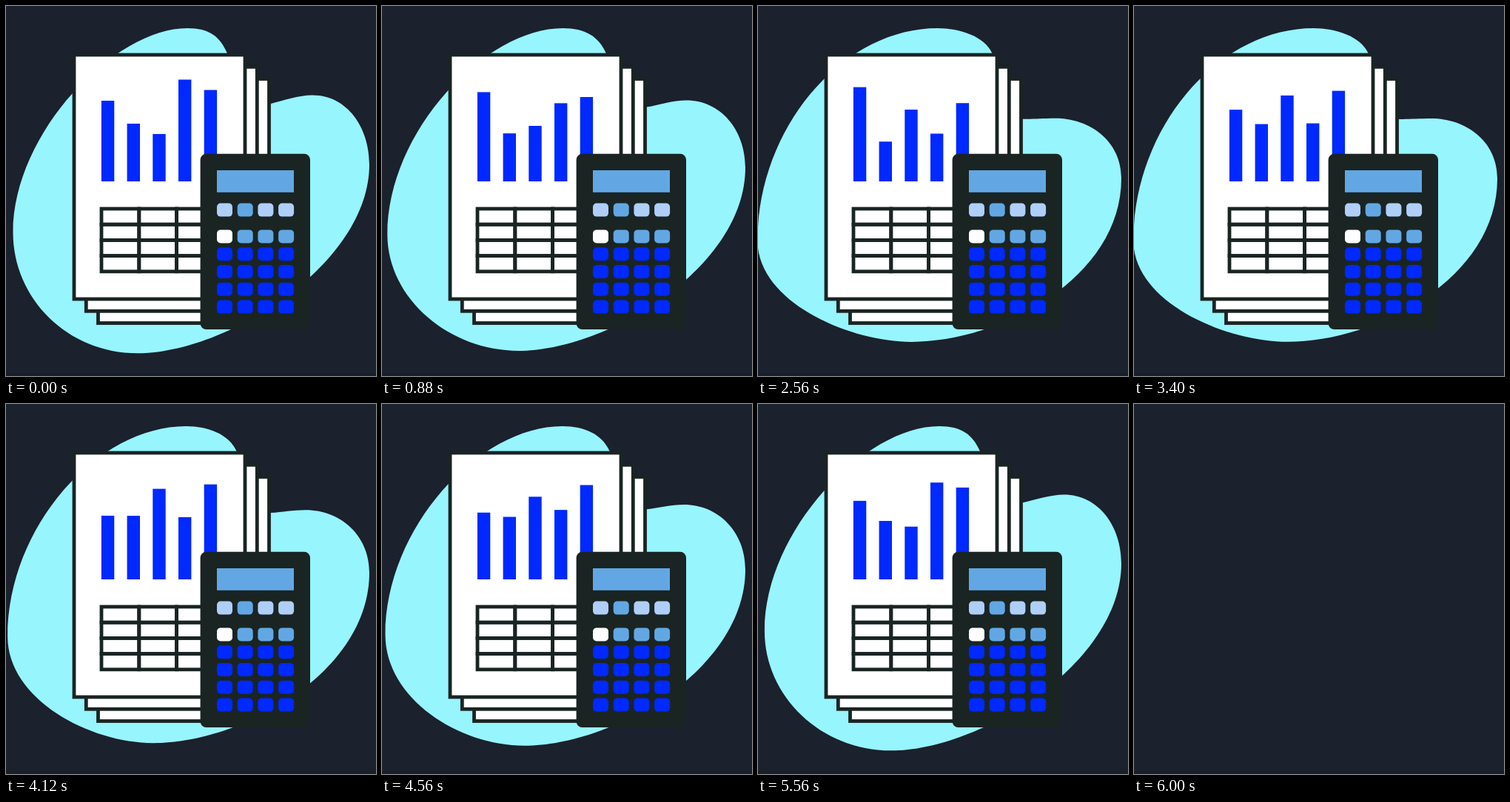
Animation of 500x500 px, one loop 6040 ms. Source, as an HTML page:

```html
<!DOCTYPE html>
<html lang="en">
<head>
<meta charset="utf-8">
<title>Report and calculator</title>
<style>
  html, body { margin: 0; width: 100%; height: 100%; overflow: hidden; background: #1b212d; }
  svg { display: block; width: 100vw; height: 100vh; }
</style>
</head>
<body>
<svg viewBox="0 0 500 500">
  <rect width="500" height="500" fill="#1b212d"/>
  <rect y="496" width="500" height="4" fill="#181e2a"/>
  <g id="scene">
    <path id="blob" fill="#97f5fd"/>
    <g id="sheets" fill="#fff" stroke="#1a2423" stroke-width="4.8"/>
    <g id="bars" fill="#0029ff"/>
    <g id="table" fill="none" stroke="#1a2423" stroke-width="4.8"/>
    <rect x="262.6" y="199.8" width="148.4" height="237.2" rx="8" fill="#1a2423"/>
    <rect x="285" y="222" width="104" height="29.8" fill="#62a7e3"/>
    <g id="keys"/>
  </g>
</svg>
<script>
const LOOP = 6040, VISIBLE = 6000;
const $ = id => document.getElementById(id);

function add(parent, tag, attrs) {
  const el = document.createElementNS('http://www.w3.org/2000/svg', tag);
  for (const name in attrs) el.setAttribute(name, attrs[name]);
  return parent.appendChild(el);
}

const mix = (a, b, p) => a + (b - a) * p;
const ease = p => p * p * (3 - 2 * p);

// Eased value at time t for evenly spaced keys that return to the first one
function cycle(keys, t) {
  const pos = t / VISIBLE * keys.length;
  const i = Math.floor(pos);
  return mix(keys[i % keys.length], keys[(i + 1) % keys.length], ease(pos - i));
}

// Curves join the outermost points of the blob; the neck hides behind the sheets
function blobPath(p) {
  const m = (a, b) => mix(a, b, p);
  const shoulder = m(132, 154);
  const crest = { x: m(414, 401), y: m(120.5, 153.7) };
  const right = { x: 491, y: m(214, 234) };
  const bottom = { x: m(178, 209), y: m(469.3, 453) };
  const left = { x: m(9.5, -1.2), y: m(306, 318) };
  const top = { x: m(245, 242.5), y: 30 };
  const neck = m(299, 317.5);
  return `M358 ${shoulder}
    C374 ${m(128, 154.5)} ${crest.x - 18} ${crest.y} ${crest.x} ${crest.y}
    C${crest.x + 47} ${crest.y} ${right.x} ${right.y - 50} ${right.x} ${right.y}
    C${right.x} ${right.y + 135} ${bottom.x + 120} ${bottom.y} ${bottom.x} ${bottom.y}
    C${bottom.x - m(95, 82)} ${bottom.y} ${left.x} ${left.y + m(89, 83)} ${left.x} ${left.y}
    C${left.x} ${left.y - m(135, 154)} ${top.x - m(98, 130)} ${top.y} ${top.x} ${top.y}
    C${top.x + 30} ${top.y} ${neck - 10} 41 ${neck} 64
    L312 100Z`;
}

for (const shift of [32.5, 16.3, 0])
  add($('sheets'), 'rect', { x: 92 + shift, y: 66 + shift, width: 231, height: 330 });

for (let row = 0; row < 4; row++)
  for (let col = 0; col < 3; col++)
    add($('table'), 'rect', { x: 129 + 50.8 * col, y: 274 + 21.2 * row, width: 50.8, height: 21.2 });

function keyColor(row, col) {
  if (row > 1) return '#0029ff';
  if (row === 1) return col ? '#62a7e3' : '#fff';
  return col === 1 ? '#62a7e3' : '#afcff9';
}
for (let row = 0; row < 6; row++)
  for (let col = 0; col < 4; col++)
    add($('keys'), 'rect', {
      x: 285 + 27.7 * col,
      y: row ? 278.6 + 23.8 * row : 266.6,
      width: 21, height: 18, rx: 5, fill: keyColor(row, col)
    });

// Heights each bar moves through during a loop
const bars = [
  [109, 137.2, 85.8],
  [78, 46.1, 86],
  [64, 90.8, 123],
  [137.5, 60, 83.5],
  [123.5, 100.4, 128.4]
].map((heights, i) => ({
  heights,
  el: add($('bars'), 'rect', { x: 128.9 + 34.7 * i, width: 17.4 })
}));

function draw(t) {
  $('scene').style.display = t < VISIBLE ? '' : 'none';
  if (t >= VISIBLE) return;
  $('blob').setAttribute('d', blobPath(cycle([0, 1], t)));
  for (const { el, heights } of bars) {
    const height = cycle(heights, t);
    el.setAttribute('y', 237 - height);
    el.setAttribute('height', height);
  }
}

const start = performance.now();
function tick() {
  draw((performance.now() - start) % LOOP);
  requestAnimationFrame(tick);
}
tick();
</script>
</body>
</html>
```
